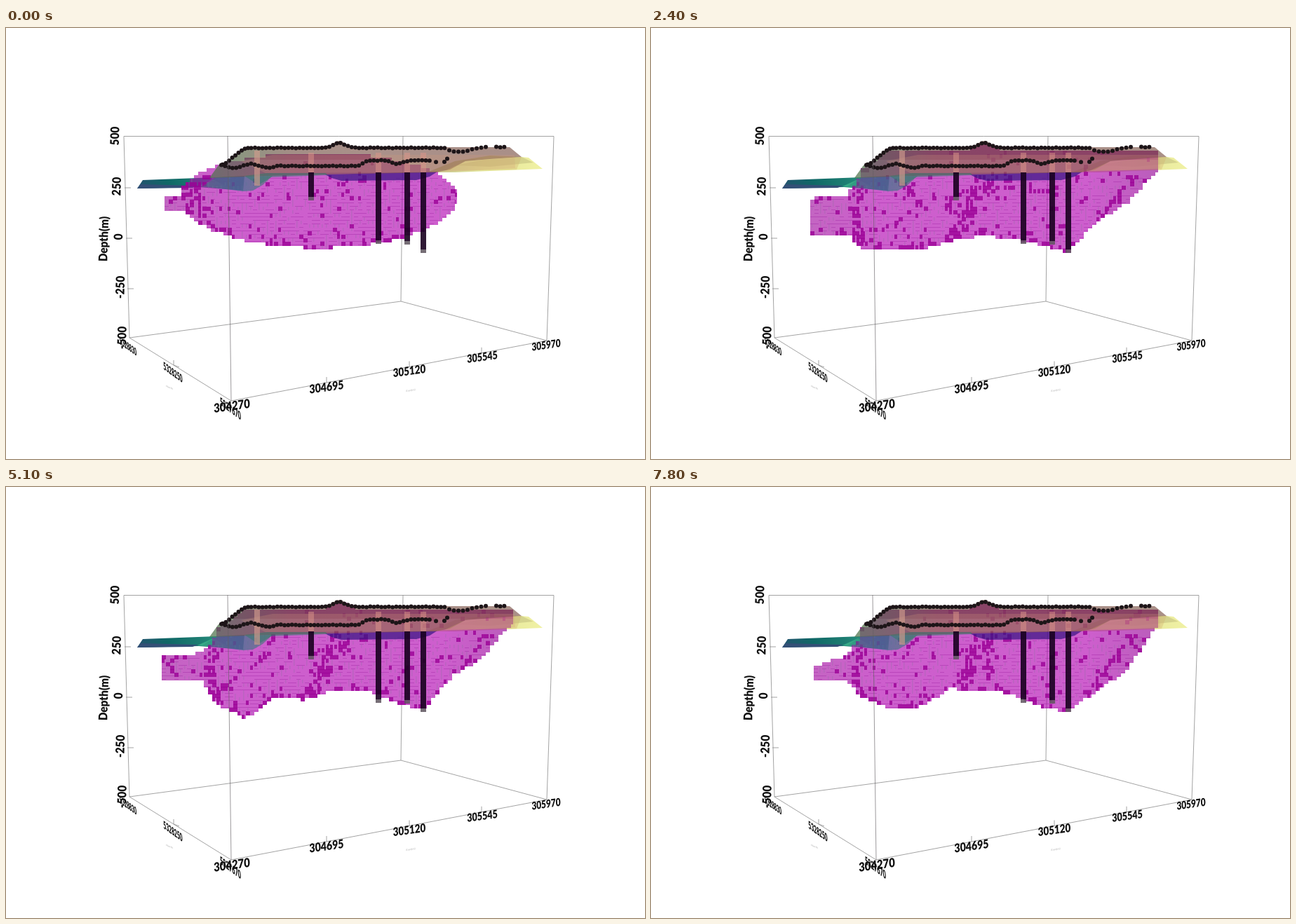
Write an HTML page with a canvas that moves like this. It is 911 px wide and 615 px high and loops after 8 s.

```html
<!DOCTYPE html>
<html lang="en">
<head>
<meta charset="utf-8">
<title>Depth model</title>
<style>
html, body { margin: 0; width: 100%; height: 100%; overflow: hidden; background: #fff; }
canvas { display: block; }
</style>
</head>
<body>
<canvas id="stage" width="911" height="615"></canvas>
<script>
const ctx = document.getElementById('stage').getContext('2d');
const LOOP = 8000, STEP = 300, CELL = 6, ROW = 5;

const mix = (a, b, k) => a + (b - a) * k;
const clamp = k => Math.max(0, Math.min(1, k));
const smooth = k => clamp(k) ** 2 * (3 - 2 * clamp(k));
const bell = d => Math.exp(-d * d);
const hash = (x, y) => {
  const s = Math.sin(x * 127.1 + y * 311.7) * 43758.5453;
  return s - Math.floor(s);
};

// Ridge line of the hill
const crest = x => 170 - 9 * bell((x - 475) / 12) + 26 * smooth((347 - x) / 46);

// The first body is an ellipsoid with a small block on its left
const arc = x => Math.sqrt(Math.max(0, 1 - ((x - 445) / 198) ** 2));
const ellipsoid = {
  time: 0, left: 226, right: 643,
  roof: x => 240 - 62 * arc(x),
  floor: x => Math.max(x < 256 ? 262 : 0, 240 + 73 * arc(x)),
};

// Later bodies: a block on the left, then depths at even distances from x = 300
function body(time, left, top, base, ...depths) {
  const join = x => clamp((x - 280) / 20);
  return {
    time, left, right: 723,
    roof: x => x < 300
      ? mix(mix(top, Math.min(top, 237), clamp((x - left) / 58)), 212, join(x))
      : crest(x) + 3,
    floor: x => {
      if (x < 300) return mix(base, depths[0], join(x));
      const u = Math.min((x - 300) / 42, depths.length - 1.001), i = Math.floor(u);
      return mix(depths[i], depths[i + 1], u - i);
    },
  };
}

const poses = [
  ellipsoid,
  body(1200, 228, 241, 308, 308, 316, 347, 309, 314, 302, 310, 321, 290, 253, 200),
  body(2400, 227, 243, 293, 315, 317, 317, 303, 296, 299, 307, 320, 274, 250, 204),
  body(3900, 227, 232, 281, 305, 337, 314, 291, 279, 300, 306, 320, 290, 240, 206),
  body(5100, 222, 241, 274, 308, 329, 299, 303, 289, 288, 306, 318, 269, 245, 194),
  body(6000, 222, 260, 270, 304, 330, 309, 290, 296, 290, 307, 319, 270, 250, 194),
  body(7800, 232, 256, 276, 299, 317, 313, 287, 289, 293, 312, 320, 290, 262, 198),
];

// Creases in the body: x at y = 262, lean, width
const folds = [[291, 0, 9], [446, 0.6, 13], [643, 0.75, 7]];

// Chance that a cell shows a steep, dark face
function steepness(x, y, floor, right, time) {
  const grown = clamp(time / 1200), s = time / 1200;
  const wave = Math.sin(x / 31 + s) + Math.sin(y / 19 + s * 2) + Math.sin((x + y) / 43 - s);
  let d = 0.06;
  if (x < 655 && x > 250) d = Math.max(d, 0.7 * bell((floor - y) / 9), 0.5 * bell((right - x) / 16));
  if (Math.abs(wave) < 0.14) d = Math.max(d, 0.5 * grown);
  for (const [fx, lean, width] of folds)
    d = Math.max(d, 0.7 * grown * bell((x - fx - (262 - y) * lean) / width));
  return Math.max(d, 0.6 * (1 - grown) * bell((x - 268) / 16));
}

function shape(color, ...p) {
  ctx.fillStyle = color;
  ctx.beginPath();
  for (let i = 0; i < p.length; i += 2) ctx.lineTo(p[i], p[i + 1]);
  ctx.fill();
}

function line(...p) {
  ctx.beginPath();
  for (let i = 0; i < p.length; i += 2) ctx.lineTo(p[i], p[i + 1]);
  ctx.stroke();
}

function ramp(x0, x1, ...colors) {
  const g = ctx.createLinearGradient(x0, 0, x1, 0);
  colors.forEach((c, i) => g.addColorStop(i / (colors.length - 1), c));
  return g;
}

function label(text, x, y, size, a, b, c, d, color = '#111') {
  ctx.save();
  ctx.transform(a, b, c, d, x, y);
  ctx.font = `900 ${size}px Lato, "Open Sans", sans-serif`;
  ctx.textAlign = 'center';
  ctx.textBaseline = 'middle';
  ctx.fillStyle = color;
  ctx.fillText(text, 0, 0);
  ctx.restore();
}

function drawBox() {
  ctx.strokeStyle = '#8c8c8c';
  ctx.lineWidth = 0.8;
  line(176, 442, 168, 154.5, 781, 154.5, 771, 446, 563, 390, 176, 442, 321, 532, 771, 446);
  line(566, 154, 563, 390);
  for (let i = 1; i < 4; i++) line(167 + 2 * i, 156 + 72 * i, 176 + 2 * i, 156 + 72 * i);
  for (const x of [457, 575, 678]) {
    const y = 532 - (x - 321) * 0.191;
    line(x, y, x, y - 8);
  }
  line(239, 474, 239, 481, 247, 484);
}

function drawLand() {
  shape(ramp(187, 320, '#24536f', '#0f6866', '#1d7d72', '#2f9a83'),
    187, 229, 195, 217, 300, 213, 340, 211, 338, 232, 275, 227);
  shape('#334f76', 187, 229, 192, 223, 274, 225, 266, 228);
  shape('#36aa86', 273, 226, 295, 216, 322, 230);
  shape(ramp(600, 765, '#c6c997', '#e4e69a', '#f0f1a4'),
    600, 206, 640, 190, 690, 182, 735, 184, 745, 185, 765, 201, 640, 206);
  shape('rgba(190,185,125,.5)', 640, 196, 680, 188, 735, 184, 752, 192, 690, 198);
}

function drawBody(a, b, k, time) {
  const snap = y => Math.round(y / ROW) * ROW;
  const left = mix(a.left, b.left, k), right = mix(a.right, b.right, k);
  const columns = [];
  for (let x = left; x < right; x += CELL) {
    const w = Math.min(CELL, right - x), mid = x + w / 2;
    const roof = mix(a.roof(mid), b.roof(mid), k), floor = mix(a.floor(mid), b.floor(mid), k);
    columns.push({ x, w, top: snap(roof), end: snap(floor) + 1 });
  }

  ctx.fillStyle = ramp(226, 726, 'rgba(162,14,160,.64)', 'rgba(177,4,177,.64)', 'rgba(177,4,177,.64)',
    'rgba(177,4,177,.64)', 'rgba(177,4,177,.64)', 'rgba(148,10,150,.66)');
  ctx.beginPath();
  for (const { x, w, top, end } of columns) ctx.rect(x, top, w, end - top);
  ctx.fill();

  for (const { x, w, top, end } of columns) {
    const i = Math.round(x / CELL);
    ctx.fillStyle = 'rgba(140,0,115,.45)';
    if (top < 188) ctx.fillRect(x, top, w, 188 - top);
    for (let y = top; y < end - 1; y += ROW) {
      const h = hash(i, y), g = hash(y, i + 9);
      if (h < steepness(x, y, end, right, time) * (y < 208 ? 0.4 : 1)) {
        ctx.fillStyle = 'rgba(155,0,150,.8)';
        ctx.fillRect(x, y, g < 0.5 ? w : w - 2, ROW + 1);
      } else if (y > 205) {
        ctx.fillStyle = 'rgba(150,25,155,.35)';
        if (g < 0.3 + (y - 205) / 300) ctx.fillRect(x, y + ROW - 1, w, 1);
        ctx.fillStyle = 'rgba(150,110,165,.35)';
        if (g > 0.7) ctx.fillRect(x + 2, y, 1.5, ROW);
      }
    }
  }
}

function drawHill() {
  shape(ramp(280, 380, 'rgba(40,140,120,.35)', 'rgba(50,115,140,.65)', 'rgba(65,125,110,.6)'),
    280, 226, 300, 213, 380, 211, 366, 224, 352, 232, 338, 233);
  shape('rgba(55,20,130,.7)', 455, 209, 615, 205, 604, 212, 585, 217, 478, 218, 464, 214);
  const ridge = [];
  for (let x = 303; x <= 718; x += 5) ridge.push(x, crest(x));
  shape(ramp(290, 640, 'rgba(75,115,75,.72)', 'rgba(112,78,66,.64)', 'rgba(118,77,66,.62)', 'rgba(117,75,63,.62)'),
    290, 214, ...ridge, 735, 184, 690, 187, 655, 190, 633, 202, 612, 206, 460, 209, 375, 211);
  shape('rgba(205,150,120,.25)', 335, 190, 380, 181, 725, 181, 726, 200, 615, 206, 370, 207);
  shape('rgba(210,175,110,.35)', 625, 204, 655, 190, 735, 184, 728, 202);
  shape('rgba(45,125,105,.5)', 340, 211, 372, 207, 456, 207, 458, 210, 378, 213, 360, 224);
}

function drawWells() {
  ctx.fillStyle = 'rgba(210,155,140,.65)';
  ctx.fillRect(354, 175, 8, 50);
  for (const [x, end] of [[435, 241], [531, 303], [572, 304], [595, 316]]) {
    ctx.fillStyle = 'rgba(222,150,138,.5)';
    ctx.fillRect(x - 4, 178, 8, 28);
    ctx.fillStyle = 'rgba(25,0,32,.9)';
    ctx.fillRect(x - 4, 206, 8, end - 206);
    ctx.fillStyle = 'rgba(95,85,95,.85)';
    ctx.fillRect(x - 4, end, 8, 5);
  }
}

function dots(from, to, gap, height) {
  ctx.fillStyle = '#1d1518';
  for (let x = from; x <= to; x += gap) {
    ctx.beginPath();
    ctx.arc(x, height(x) + hash(x, 3) - 0.5, 3, 0, 7);
    ctx.fill();
  }
}

function drawDots() {
  const upper = x => crest(x) + 1 + 2 * bell((x - 475) / 12);
  const lower = x => 197 + 3 * Math.sin((x - 312) / 8) * smooth((400 - x) / 30)
    - 8 * smooth((x - 500) / 18) + 5 * bell((x - 558) / 10);
  const right = x => 170 + 7 * bell((x - 646) / 20);
  dots(309, 350, 4.5, upper);
  dots(355, 626, 5.3, upper);
  dots(632, 690, 6.5, right);
  dots(699, 716, 5.7, right);
  dots(307, 604, 5.3, lower);
  dots(613, 625, 12, () => 191);
  dots(629, 629, 1, () => 187);
}

function drawLabels() {
  const upright = (text, x, y) => label(text, x, y, 15.3, 0.03, -1, 1.12, 0.03);
  for (let i = 0; i < 5; i++) upright(500 - 250 * i, 156 + 2.5 * i, 154 + 72 * i);
  upright('Depth(m)', 140, 301);
  // Label sizes shrink with distance
  [[322, 540], [457, 513], [575, 490], [679, 470], [770, 453]].forEach(([x, y], i) =>
    label(304270 + 425 * i, x, y, 14.8 - 0.75 * i, 1, -0.14, 0.06, 1.2 + 0.03 * i));
  [[174, 455], [238, 492], [320, 544]].forEach(([x, y], i) =>
    label(5328830 - 580 * i, x, y, 15, 0.4 + 0.045 * i, 0.28 + 0.04 * i, 0.08, 1 + 0.05 * i));
  label('North', 233, 513, 4, 0.9, 0.4, 0, 0.9, '#ccc');
  label('East(m)', 577, 517, 4, 1, -0.16, 0, 0.9, '#ccc');
}

function draw(time) {
  let i = 0;
  while (i < poses.length - 2 && time >= poses[i + 1].time) i++;
  const a = poses[i], b = poses[i + 1];
  ctx.fillStyle = '#fff';
  ctx.fillRect(0, 0, 911, 615);
  drawBox();
  drawLand();
  drawBody(a, b, (time - a.time) / (b.time - a.time), time);
  drawHill();
  drawWells();
  drawDots();
  ctx.strokeStyle = 'rgba(100,95,100,.8)';
  line(316, 154, 321, 532);
  drawLabels();
}

let shown = -1;
const start = performance.now();
function tick() {
  const step = Math.floor(((performance.now() - start) % LOOP) / STEP);
  if (step !== shown) draw((shown = step) * STEP);
  requestAnimationFrame(tick);
}
tick();
</script>
</body>
</html>
```
